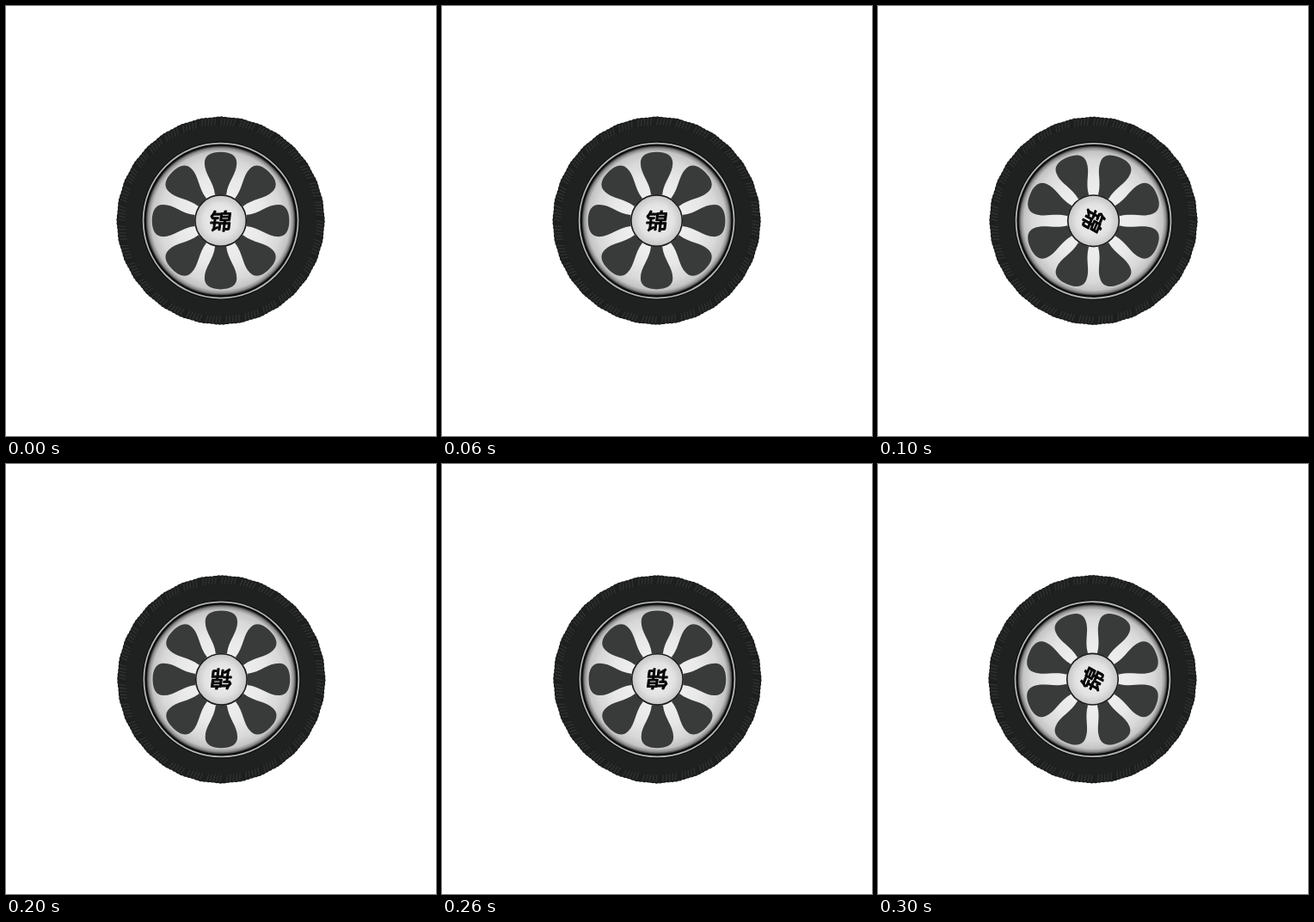
Animation of 500x500 px, one loop 400 ms. Source, as an HTML page with a canvas:

```html
<!DOCTYPE html>
<html lang="zh">
<head>
<meta charset="utf-8">
<title>Spinning wheel</title>
<style>
  html, body { margin: 0; width: 100%; height: 100%; overflow: hidden; background: #fff; }
  canvas { display: block; width: 500px; height: 500px; }
</style>
</head>
<body>
<canvas id="stage" width="500" height="500"></canvas>
<script>
const ctx = document.getElementById('stage').getContext('2d');
const TAU = Math.PI * 2;
const STEP_MS = 100;
const POSES = [0, 112.5, 180, 292.5];
const WOBBLE = -0.4; // the wheel sits slightly off its axle

function disc(r, fill) {
  ctx.beginPath();
  ctx.arc(0, 0, r, 0, TAU);
  ctx.fillStyle = fill;
  ctx.fill();
}

function ring(r, width, stroke) {
  ctx.beginPath();
  ctx.arc(0, 0, r, 0, TAU);
  ctx.lineWidth = width;
  ctx.strokeStyle = stroke;
  ctx.stroke();
}

function radial(r0, r1, stops) {
  const g = ctx.createRadialGradient(0, 0, r0, 0, 0, r1);
  stops.forEach(([at, color]) => g.addColorStop(at, color));
  return g;
}

const chrome = radial(24, 87, [
  [0, '#f0f0f0'], [0.45, '#e8e8e8'], [0.75, '#d8d8d8'], [0.9, '#c4c4c4'], [0.96, '#8a8a8a'], [1, '#2a2a2a']
]);
const hub = radial(4, 30, [[0, '#efefef'], [0.6, '#e2e2e2'], [1, '#c4c4c4']]);

// Tyre with lugs of fine slanted grooves near the edge.
function drawTyre() {
  ctx.beginPath();
  for (let i = 0; i <= 720; i++) {
    const a = i / 720 * TAU;
    const r = 120.7 + 0.3 * Math.cos(a * 32) + 0.25 * Math.sin(a * 160);
    ctx.lineTo(r * Math.cos(a), r * Math.sin(a));
  }
  ctx.closePath();
  ctx.fillStyle = '#1d1f1e';
  ctx.fill();

  ctx.lineWidth = 1.4;
  ctx.strokeStyle = '#303231';
  for (let i = 0; i < 192; i++) {
    if (i % 6 === 5) continue;
    const a = i / 192 * TAU;
    ctx.beginPath();
    ctx.moveTo(111 * Math.cos(a), 111 * Math.sin(a));
    ctx.lineTo(119 * Math.cos(a + 0.015), 119 * Math.sin(a + 0.015));
    ctx.stroke();
  }
  disc(111, '#1e2120');
}

function drawRim() {
  disc(92, '#0c0d0d');
  ring(90, 1.8, '#b4b4b4');
  disc(87, chrome);
}

function drawPetal() {
  ctx.beginPath();
  ctx.moveTo(-6.5, -30);
  ctx.bezierCurveTo(-8.5, -46, -18.7, -54, -18.7, -67);
  ctx.bezierCurveTo(-18.7, -76, -11, -79.8, 0, -79.8);
  ctx.bezierCurveTo(11, -79.8, 18.7, -76, 18.7, -67);
  ctx.bezierCurveTo(18.7, -54, 8.5, -46, 6.5, -30);
  ctx.closePath();
  ctx.fillStyle = '#393b3b';
  ctx.fill();
}

function drawSign() {
  ctx.save();
  ctx.transform(1, 0, -0.12, 1, 0, 0);
  ctx.font = '26px "Noto Sans CJK SC", "Noto Sans CJK", sans-serif';
  ctx.textAlign = 'center';
  ctx.lineJoin = 'round';
  ctx.lineWidth = 1.3;
  ctx.strokeStyle = ctx.fillStyle = '#050505';
  ctx.strokeText('锦', 0, 10);
  ctx.fillText('锦', 0, 10);
  ctx.restore();
}

function draw(degrees) {
  ctx.clearRect(0, 0, 500, 500);
  ctx.save();
  ctx.translate(250, 250);
  ctx.rotate(degrees * TAU / 360);
  ctx.translate(WOBBLE, WOBBLE);

  drawTyre();
  drawRim();
  for (let i = 0; i < 8; i++) {
    drawPetal();
    ctx.rotate(TAU / 8);
  }
  disc(29.5, hub);
  ring(29.7, 1.6, '#1a1a1a');
  drawSign();
  ctx.restore();
}

function tick() {
  const step = Math.floor(performance.now() / STEP_MS) % POSES.length;
  draw(POSES[step]);
  requestAnimationFrame(tick);
}
tick();
</script>
</body>
</html>
```
